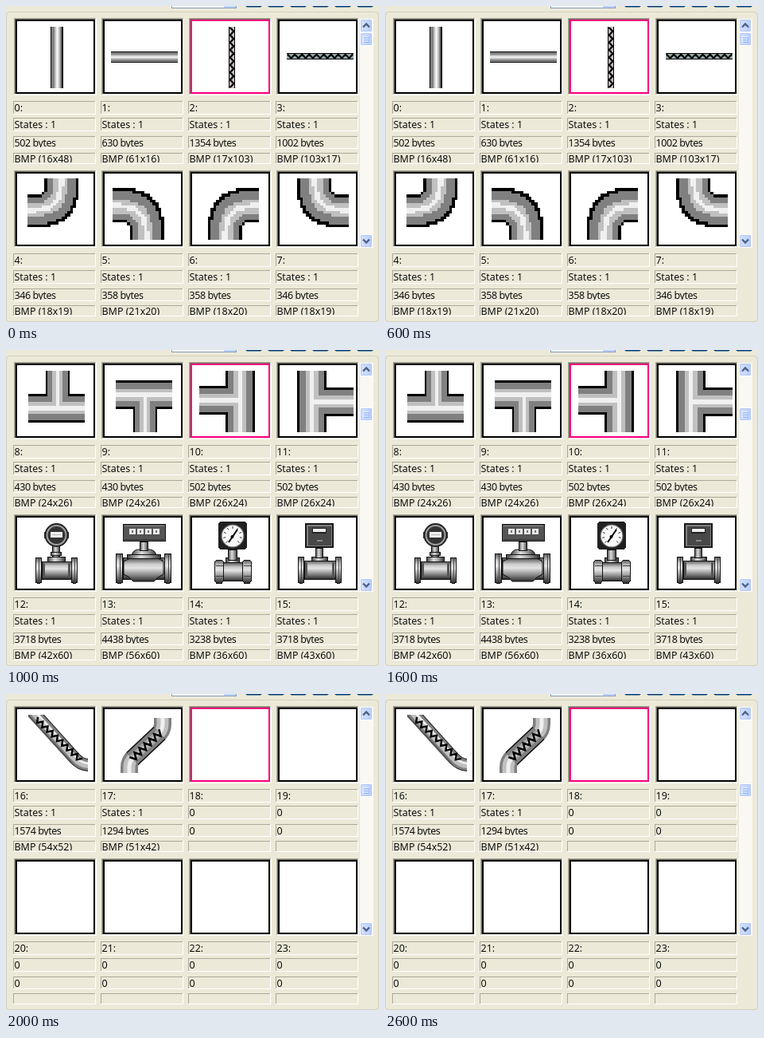
Animation, 469 px wide and 396 px high, one loop 3 s. Source, as an HTML page:

```html
<!DOCTYPE html>
<html lang="en">
<head>
<meta charset="utf-8">
<title>Bitmap browser</title>
<style>
html, body { margin: 0; width: 100%; height: 100%; overflow: hidden; background: #ece9d8; }
svg { display: block; shape-rendering: crispEdges; }
text { font: 12.5px "Open Sans", "Noto Sans", sans-serif; fill: #000; white-space: pre; }
.smooth { shape-rendering: geometricPrecision; }
</style>
</head>
<body>
<svg id="stage" width="469" height="396" viewBox="0 0 469 396">
  <defs>
    <linearGradient id="across" x2="0" y2="1">
      <stop offset="0" stop-color="#555"/><stop offset=".25" stop-color="#ccc"/>
      <stop offset=".42" stop-color="#e4e4e4"/><stop offset=".75" stop-color="#808080"/><stop offset="1" stop-color="#2c2c2c"/>
    </linearGradient>
    <linearGradient id="along">
      <stop offset="0" stop-color="#444"/><stop offset=".4" stop-color="#dcdcdc"/>
      <stop offset=".65" stop-color="#a4a4a4"/><stop offset="1" stop-color="#333"/>
    </linearGradient>
    <linearGradient id="bar"><stop offset="0" stop-color="#d6e2ff"/><stop offset="1" stop-color="#b9cdfa"/></linearGradient>
  </defs>
  <g id="chrome"></g>
  <g id="page"></g>
  <g id="thumb"></g>
</svg>
<script>
const $ = id => document.getElementById(id);
const GRAY = '#808080', SILVER = '#c0c0c0', LIGHT = '#f0f0f0';
const BANDS = ['#000', GRAY, SILVER, LIGHT, SILVER, GRAY, '#000'];
const EDGES = [0, .08, .27, .43, .57, .7, .92, 1];

const rect = (x, y, w, h, fill, more = '') =>
  `<rect x="${x}" y="${y}" width="${w}" height="${h}" fill="${fill}" ${more}/>`;
const path = (d, fill, stroke = 'none', width = 1, more = '') =>
  `<path d="${d}" fill="${fill}" stroke="${stroke}" stroke-width="${width}" ${more}/>`;
const line = (d, stroke, width) => path(d, 'none', stroke, width, 'class="smooth"');
const disc = (x, y, r, fill) => `<circle class="smooth" cx="${x}" cy="${y}" r="${r}" fill="${fill}"/>`;
const group = (t, s) => `<g transform="${t}">${s}</g>`;
const edge = 'stroke="#111"';

// Straight tube, shaded in bands across its thickness.
function tube(x, y, w, h, upright, edges = EDGES) {
  return BANDS.map((c, i) => {
    const a = edges[i], b = edges[i + 1] - a;
    return upright ? rect(x + a * w, y, b * w, h, c) : rect(x, y + a * h, w, b * h, c);
  }).join('');
}

// Squarish quarter bend in cells around the corner (x, y).
function elbow(x, y, sx, sy) {
  const rims = [6.5, 7.5, 9.5, 11, 12.6, 14, 17, 18.1], p = 2.9;
  const cells = BANDS.map(() => '');
  for (let j = 0; j < 18; j++) for (let i = 0; i < 18; i++) {
    const r = ((i + .5) ** p + (j + .5) ** p) ** (1 / p);
    const k = rims.findIndex((a, n) => r >= a && r < rims[n + 1]);
    if (k >= 0) cells[k] += `M${i} ${j}h1v1h-1z`;
  }
  return group(`translate(${x} ${y}) scale(${sx} ${sy})`, cells.map((d, k) => path(d, BANDS[k])).join(''));
}

// Main tube of length len, with a branch going up at left.
function tee(len, thick, left, wide, tall, place) {
  const branch = BANDS.map((c, i) => {
    const depth = EDGES[Math.min(i, 6 - i) + 1] * thick;
    return rect(left + EDGES[i] * wide, -tall, (EDGES[i + 1] - EDGES[i]) * wide, tall + depth, c);
  }).join('');
  return group(place, tube(0, 0, len, thick, false) + branch);
}

function zigzag(x1, y1, x2, y2, teeth, amp) {
  const dx = x2 - x1, dy = y2 - y1, len = Math.hypot(dx, dy), n = teeth * 2;
  let d = '';
  for (let i = 0; i <= n; i++) {
    const s = i % 2 ? amp : -amp;
    d += `${i ? 'L' : 'M'}${(x1 + dx * i / n - dy / len * s).toFixed(1)} ${(y1 + dy * i / n + dx / len * s).toFixed(1)}`;
  }
  return d;
}

const coil = (len, tint) => rect(0, 0, len, 8, tint) + rect(0, 0, len, 1, '#000') + rect(0, 7, len, 1, '#000') +
  line(zigzag(1, 4, len - 1, 4, Math.round(len / 9.5), 2.4), '#000', 2.2);

const nested = (d, layers) => layers.map(([c, w]) => line(d, c, w)).join('');
const clipped = (x, y, w, h, s) =>
  `<svg x="${x}" y="${y}" width="${w}" height="${h}" viewBox="${x} ${y} ${w} ${h}">${s}</svg>`;

function flanged(l, r, top, bottom, w) {
  const h = bottom - top, mid = l + w, span = r - l - 2 * w;
  return rect(mid, top + 5, span, h - 10, 'url(#across)', edge) +
    [l, r - w].map(x => rect(x + .5, top, w - 1, h, 'url(#across)', edge + ' rx="1.5"') +
      rect(x + w / 2, top + 1, 1, h - 2, '#444')).join('') +
    [mid + 1, r - w - 4].map(x => rect(x, top + 7, 3, h - 14, '#555')).join('');
}
const neck = (x, y, w, h) => rect(x, y, w, h, 'url(#along)', edge);

function roundMeter() {
  return flanged(37, 90, 69, 101, 8) + neck(52.5, 68.5, 22, 6) + neck(58.5, 54, 9, 14) + neck(56.5, 62.5, 13, 4) +
    rect(48, 37, 3, 8, '#333') + rect(76, 37, 3, 8, '#333') +
    disc(63.5, 41, 15, '#222') + disc(63.5, 41, 13, '#a0a0a0') + disc(63.5, 41, 11, '#333') +
    rect(56, 37, 15, 7, '#f0f0f0') + rect(58, 40, 11, 1, '#bbb');
}

function counterMeter() {
  let s = flanged(28, 98, 64, 101, 9) +
    path('M38 74L46 70H81L88 74V90Q80 93 76 99H50Q46 93 38 90Z', 'url(#across)', '#111', 1, 'class="smooth"') +
    path('M48 66Q50 59 57 59H70Q77 59 79 66Z', 'url(#along)', '#111', 1, 'class="smooth"') +
    neck(42.5, 65.5, 42, 5) + neck(58.5, 49, 10, 11) +
    rect(37.5, 27.5, 53, 21, '#555', edge) + rect(39, 29, 50, 1, '#888') + rect(39, 46, 50, 1, '#333');
  for (let i = 0; i < 4; i++)
    s += rect(45 + i * 10, 33, 8, 7, '#e8e8e8') + rect(48 + i * 10, 35, 2, 3, '#777');
  return s;
}

function gauge() {
  let ticks = '';
  for (let i = 0; i < 9; i++) {
    const a = (135 + i * 33.75) * Math.PI / 180, c = Math.cos(a), s = Math.sin(a);
    ticks += `M${65 + 9 * c} ${42 + 9 * s}L${65 + 12 * c} ${42 + 12 * s}`;
  }
  return rect(51.5, 75.5, 28, 23, 'url(#across)', edge) +
    [42.5, 77.5].map(x => path(`M${x} 75l2 -3h7l2 3v23l-2 3h-7l-2 -3z`, 'url(#across)', '#111') +
      rect(x + 1, 79, 9, 1, '#444') + rect(x + 1, 92, 9, 1, '#444')).join('') +
    neck(56.5, 69.5, 17, 6) + neck(59.5, 59, 11, 13) +
    rect(47, 24, 36, 35, '#202020', 'rx="4"') + disc(65, 42, 14.5, '#777') + disc(65, 42, 13.3, '#f8f8f8') +
    line(ticks, '#333', 1) + line('M60 50L71 34', '#000', 2) + disc(64.5, 43, 2, '#000');
}

function boxMeter() {
  return flanged(37, 92, 68, 101, 8) + neck(54.5, 68.5, 20, 5) + neck(59.5, 57, 9, 12) +
    rect(46, 26, 36, 31, '#181818') + rect(48, 28, 32, 27, '#808080') + rect(50, 30, 29, 24, '#484848') +
    rect(55, 32, 18, 7, '#222') + rect(56, 33, 16, 4, '#f0f0f0') + rect(61, 47, 7, 2, '#888');
}

function slantDown() {
  const d = 'M30 18L86 80Q94 89 104 89';
  return clipped(28, 26, 75, 71, nested(d, [['#111', 16], [GRAY, 14], [SILVER, 8]]) +
    line('M33 18L89 80Q95 87 104 87', LIGHT, 2.5) +
    line('M28 27L83 87', '#555', 2) +
    line(zigzag(38, 31, 94, 83, 9, 3), '#000', 2.4));
}

function slantUp() {
  const d = 'M45 100V92Q45 84 51 79L80 52Q87 46 87 38V29';
  return clipped(34, 30, 64, 69, nested(d, [[GRAY, 22], [SILVER, 15], [LIGHT, 5]]) +
    nested('M49 81L83 49', [['#111', 22], [GRAY, 19], ['#a8a8a8', 10], ['#d0d0d0', 4]]) +
    line(zigzag(48, 82, 85, 47, 6, 3.8), '#000', 2.6));
}

const items = [
  [502, '16x48', () => tube(56, 26, 16, 77, true, [0, .09, .3, .44, .6, .74, .9, 1])],
  [630, '61x16', () => tube(22, 57, 84, 14, false, [0, .09, .3, .4, .58, .74, .9, 1])],
  [1354, '17x103', () => group('matrix(0 1 1 0 60 26)', coil(77, '#c4bcbc'))],
  [1002, '103x17', () => group('translate(23 59)', coil(84, '#98a8a8'))],
  [346, '18x19', () => elbow(27, 25, 3.58, 3.4)],
  [358, '21x20', () => elbow(24, 102, 3.6, -3.6)],
  [358, '18x20', () => elbow(98, 102, -3.58, -3.6)],
  [346, '18x19', () => elbow(101, 25, -3.6, 3.4)],
  [430, '24x26', () => tee(71, 36, 22, 30, 29, 'translate(28 55)')],
  [430, '24x26', () => tee(71, 36, 22, 30, 29, 'translate(28 74) scale(1 -1)')],
  [502, '26x24', () => tee(77, 37, 19, 36, 33, 'matrix(0 1 1 0 56 26)')],
  [502, '26x24', () => tee(77, 37, 21, 36, 34, 'matrix(0 1 -1 0 73 26)')],
  [3718, '42x60', roundMeter],
  [4438, '56x60', counterMeter],
  [3238, '36x60', gauge],
  [3718, '43x60', boxMeter],
  [1574, '54x52', slantDown],
  [1294, '51x42', slantUp]
];

// Caption rows: top, height, baseline, letter spacing.
const rows = [[119, 17, 132, 0], [140, 17, 153, 0], [163, 16, 176, -.4], [184, 14, 196, 0]];
const place = i => `translate(${i % 4 * 110} ${(i >> 2) * 191})`;

const sunken = (x, y, w, h, dark = '#aca899', pale = '#fff') => rect(x, y, w, 1, dark) + rect(x, y, 1, h, dark) +
  rect(x, y + h - 1, w, 1, pale) + rect(x + w - 1, y, 1, h, pale);

function slot(i) {
  return group(place(i), sunken(10, 15, 104, 97) + sunken(11, 16, 102, 95, '#716f64', '#f1efe2') +
    rect(13, 18, 98, 91, '#fff', `stroke="${i === 2 ? '#ff0080' : '#000'}" stroke-width="2"`) +
    rows.map(([y, h]) => sunken(9, y, 104, h)).join(''));
}

function entry(i, n) {
  const it = items[n];
  const words = it ? [`${n}:`, 'States : 1', `${it[0]} bytes`, `BMP (${it[1]})`] : [`${n}:`, '0', '0', ''];
  const caption = words.map((w, r) => {
    const [y, h, base, gap] = rows[r];
    return clipped(10, y + 1, 102, h - 3, `<text x="10.5" y="${base}" letter-spacing="${gap}">${w}</text>`);
  }).join('');
  return group(place(i), (it ? it[2]() : '') + caption);
}

const knob = (y, h) => rect(445.5, y + .5, 15, h - 1, 'url(#bar)', 'rx="2" stroke="#fff" class="smooth"') +
  rect(446.5, y + 1.5, 13, h - 3, 'none', 'rx="1.5" stroke="#b4c8f6" class="smooth"');

function chrome() {
  let s = rect(.5, 7.5, 468, 388, 'none', 'rx="4" stroke="#d0d0bf" class="smooth"') +
    rect(208, 0, 82, 3, '#7f9db9') + rect(209, 0, 80, 2, '#fff') + rect(274, 0, 15, 2, '#c1d3fb');
  for (let i = 0; i < 6; i++) s += path(`M${301 + i * 28} 0h21l-2 1.5h-17z`, '#003c74', 'none', 1, 'class="smooth"');
  for (let i = 0; i < 8; i++) s += slot(i);
  return s + rect(445, 16, 17, 287, '#f9f8f3') + knob(16, 17) + knob(286, 17) +
    line('M449 26.5l4 -4l4 4M449 292.5l4 4l4 -4', '#4d6185', 2.4);
}

function thumb() {
  let s = knob(33, 17);
  for (let i = 0; i < 4; i++) s += rect(449, 38 + i * 2, 7, 1, '#eef4fe') + rect(450, 39 + i * 2, 7, 1, '#8cb0f8');
  return s;
}

let shown = -1;
function draw(ms) {
  const p = Math.floor(ms / 1000) % 3;
  if (p === shown) return;
  shown = p;
  let s = '';
  for (let i = 0; i < 8; i++) s += entry(i, p * 8 + i);
  $('page').innerHTML = s;
  $('thumb').setAttribute('transform', `translate(0 ${Math.floor(p * 39.5)})`);
}

$('chrome').innerHTML = chrome();
$('thumb').innerHTML = thumb();
const start = performance.now();
function tick() {
  draw(performance.now() - start);
  requestAnimationFrame(tick);
}
tick();
</script>
</body>
</html>
```
